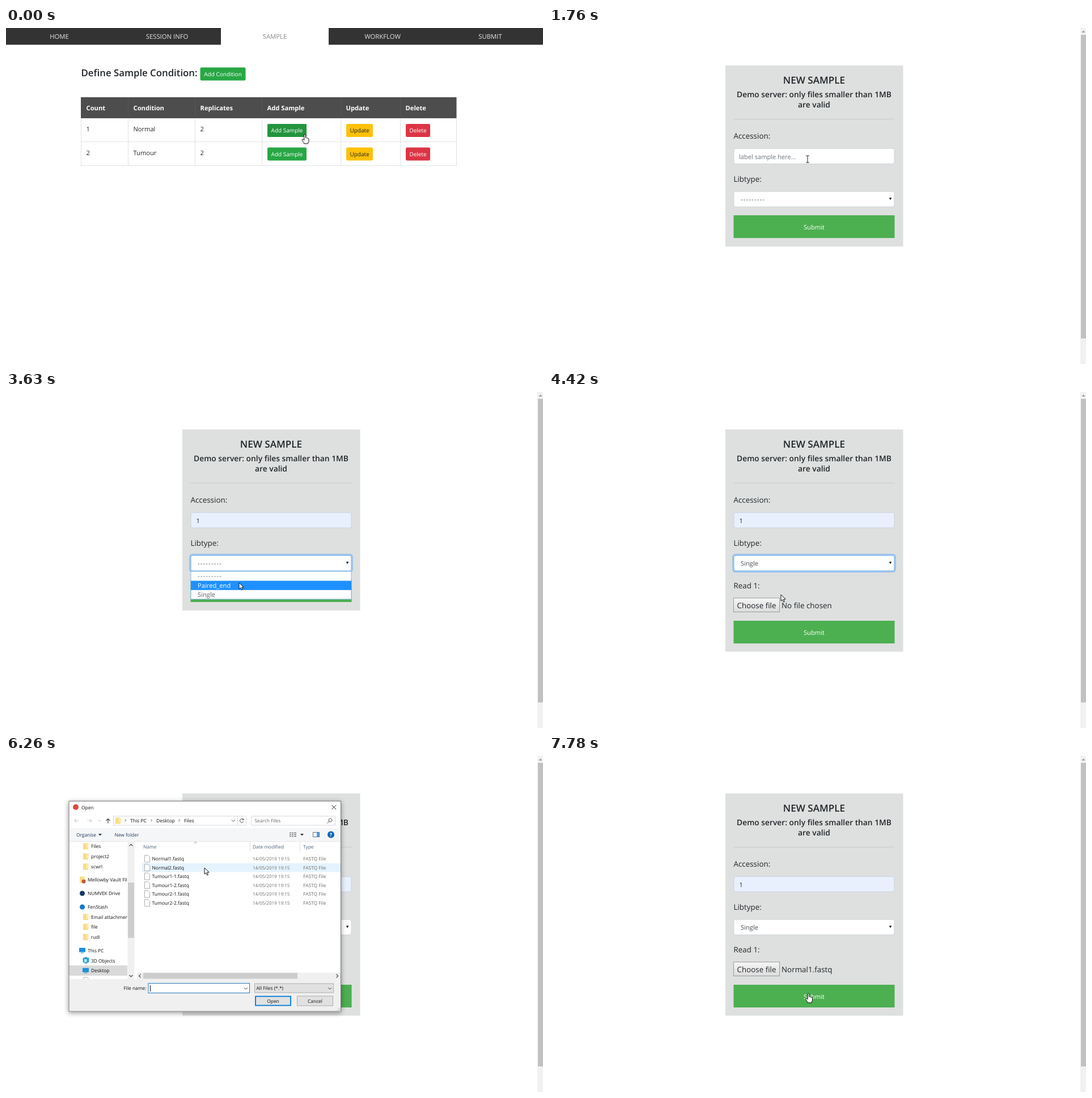
An HTML page for the animation above (7990 ms loop, 947 by 592 pixels).

```html
<!DOCTYPE html>
<html lang="en">
<head>
<meta charset="utf-8">
<title>Adding a sample</title>
<style>
  html, body { margin: 0; width: 100%; height: 100%; overflow: hidden; background: #fff; }
  svg { display: block; width: 947px; height: 592px; font-family: "Open Sans", "Noto Sans", sans-serif; }
  text { white-space: pre; text-rendering: geometricPrecision; }
  .mid { text-anchor: middle; }
  .end { text-anchor: end; }
  .semi { font-weight: 600; }
  .bold { font-weight: 700; }
  .dash { letter-spacing: 1.18px; }
  #dialog { transform-origin: 350px 265px; filter: drop-shadow(0 2px 4px #0006); }
</style>
</head>
<body>
<svg id="stage" viewBox="0 0 947 592"></svg>
<script>
const LOOP = 7990;

const box = (x, y, w, h, fill, more = '') =>
  `<rect x="${x}" y="${y}" width="${w}" height="${h}" fill="${fill}" ${more}/>`;
const text = (x, y, str, size, fill, cls = '') =>
  `<text x="${x}" y="${y}" font-size="${size}" fill="${fill}" class="${cls}">${str}</text>`;
const line = (d, stroke, width = 1) =>
  `<path d="${d}" fill="none" stroke="${stroke}" stroke-width="${width}"/>`;
const shape = (d, fill) => `<path d="${d}" fill="${fill}"/>`;
const dot = (x, y, r, fill) => `<circle cx="${x}" cy="${y}" r="${r}" fill="${fill}"/>`;
const layer = (id, ...parts) => `<g id="${id}">${parts.join('')}</g>`;
const framed = (x, y, w, h, fill, stroke, more = '') =>
  box(x + .5, y + .5, w - 1, h - 1, fill, `stroke="${stroke}" ${more}`);
const chevron = (x, y, stroke = '#444') => line(`M${x - 3} ${y - 1.5}l3 3 3-3`, stroke);

// Table page
function tablePage() {
  const edges = [132, 215, 333, 451, 590, 695, 794];
  const heads = ['Count', 'Condition', 'Replicates', 'Add Sample', 'Update', 'Delete'];
  const tabs = ['HOME', 'SESSION INFO', 'SAMPLE', 'WORKFLOW', 'SUBMIT'];
  const button = (x, y, w, label, fill, ink = '#fff') =>
    box(x, y, w, 23, fill, 'rx="2.5"') + text(x + w / 2, y + 15.2, label, 10, ink, 'mid');

  let out = box(0, 0, 947, 29.5, '#333') + box(379, 0, 190, 30, '#fff');
  tabs.forEach((tab, i) => {
    out += text(94 + i * 190, 19, tab, 11.3, i === 2 ? '#888' : '#e6e6e6', 'mid');
  });
  out += text(132.5, 85, 'Define Sample Condition:', 16.8, '#212529', 'semi');
  out += button(342.5, 69.5, 80, 'Add Condition', '#28a745');
  out += box(132, 122, 662.5, 37, '#4d4d4d');
  out += edges.slice(1, 6).map(x => line(`M${x + .5} 122v37`, '#565656')).join('');
  out += heads.map((h, i) => text(edges[i] + 9.5, 145, h, 11.2, '#fff', 'bold')).join('');
  ['Normal', 'Tumour'].forEach((name, i) => {
    const y = 159 + i * 41.5;
    out += [i + 1, name, 2].map((v, c) => text(edges[c] + 9.5, y + 23, v, 11.1, '#212529')).join('');
    out += button(461, y + 10, 69, 'Add Sample', '#28a745');
    out += button(600, y + 10, 47, 'Update', '#ffc107', '#212529');
    out += button(705, y + 10, 43, 'Delete', '#dc3545');
  });
  out += line(edges.map(x => `M${x + .5} 159V242.5`).join('') + 'M132 200.5H795M132 242.5H795', '#dee2e6');
  return layer('table', out,
    layer('warm', button(461, 169, 69, 'Add Sample', '#24943f')),
    layer('hover', button(461, 169, 69, 'Add Sample', '#218838')),
    layer('pressed', box(459.5, 167.5, 72, 26, 'none', 'rx="4" stroke="#28a745" stroke-opacity=".5" stroke-width="3"')));
}

// Form page
const field = (y, fill) => framed(325.5, y, 284, 28, fill, '#ced4da', 'rx="3"');
const ring = (id, y) => layer(id,
  box(324.5, y - 1, 286, 30, 'none', 'rx="4" stroke="#007bff" stroke-opacity=".28" stroke-width="3"'),
  framed(325.5, y, 284, 28, 'none', '#80bdff', 'rx="3"'));
const dashes = (y, fill = '#495057') => text(338, y, '-'.repeat(9), 11.2, fill, 'dash');

function submit(y) {
  return box(325.5, y, 284, 40, '#4caf50') + text(467.5, y + 24.5, 'Submit', 11.2, '#fff', 'mid');
}

function options(id, picked) {
  const rows = ['', 'Paired_end', 'Single'].map((label, i) => {
    const y = 316.3 + i * 16.3;
    const ink = i === picked ? '#fff' : '#5c6369';
    return (i === picked ? box(326, y, 283, 16.3, '#1e90ff') : '') +
      (i ? text(338, y + 12.3, label, 11.2, ink) : dashes(y + 12, ink));
  });
  return layer(id, framed(325.5, 315.5, 284, 50, '#fff', '#8fb4dc'), ...rows);
}

function suggestions() {
  const rows = Array.from({ length: 7 }, (_, i) => text(335.5, 258 + i * 24.3, i + 1, 11.1, '#333'));
  return layer('suggest', framed(325, 240, 286, 175, '#fff', '#c4c4c4'),
    layer('suggestHover', box(326, 242, 284, 24.3, '#e3e3e3')), ...rows);
}

function formPage() {
  const ink = '#212529';
  return layer('form',
    box(937, 0, 10, 592, '#f1f1f1'), box(938, 12, 9, 535, '#c1c1c1'), shape('M939.5 8l3-3.5 3 3.5z', '#9a9a9a'),
    layer('short', box(311, 66, 313.5, 319, '#dee0df'), submit(330)),
    layer('tall', box(311, 66, 313.5, 391.5, '#dee0df'), submit(403),
      text(325.5, 346, 'Read 1:', 13.4, ink),
      framed(325, 362.5, 82, 25.5, 'url(#face)', '#9a9a9a'),
      layer('chooseHover', box(326, 363.5, 80, 23.5, '#fff', 'opacity=".35"')),
      text(366, 381, 'Choose file', 13.4, ink, 'mid'),
      layer('noFile', text(410, 381, 'No file chosen', 13.4, ink)),
      layer('hasFile', text(410, 381, 'Normal1.fastq', 13.4, ink))),
    text(467.5, 98, 'NEW SAMPLE', 17.1, ink, 'semi mid'),
    text(467.5, 122, 'Demo server: only files smaller than 1MB', 13.8, ink, 'semi mid'),
    text(467.5, 139.5, 'are valid', 13.8, ink, 'semi mid'),
    line('M325.5 160.5H609.5', '#c8cac9'),
    text(325.5, 195, 'Accession:', 13.4, ink), text(325.5, 271, 'Libtype:', 13.4, ink),
    field(211.8, '#fff'), field(287.6, '#fff'),
    layer('filled', field(211.8, '#e8f0fe')),
    layer('hint', text(335, 231, 'label sample here...', 11.1, '#6c757d')),
    layer('typed', text(335.5, 231, '1', 11.2, ink)),
    layer('caretA', box(335, 219, 1, 14, '#333')), layer('caretB', box(342, 219, 1, 14, '#333')),
    layer('none', dashes(306)), layer('single', text(338, 306, 'Single', 11.2, '#495057')),
    shape('M599.7 299h4.6l-2.3 4.2z', '#222'),
    ring('ringA', 211.8), ring('ringB', 287.6),
    suggestions(), options('pick0', 0), options('pick1', 1), options('pick2', 2));
}

// File dialog
const folder = (x, y) => box(x, y - 5.5, 9, 11, '#f9dc84') + box(x + 5.5, y - 5.5, 4, 9, '#ffe9a9');
const sheet = (x, y) => `<path d="M${x} ${y - 6}h6l3 3v9h-9z" fill="#fff" stroke="#999" stroke-width=".8"/>`;
const screen = (x, y) => box(x, y - 4.5, 11, 7.5, '#1d8fdc') + box(x + 3, y + 4, 5, 1, '#4b7fa8');

function sidebar() {
  const ink = '#111';
  const row = (x, y, label) => text(x, y + 3, label, 8.4, ink);
  const dirs = [['Files', 159], ['project2', 177], ['scwrl', 195],
    ['Email attachmen', 283.5], ['file', 301], ['rudi', 319]];
  return `<g clip-path="url(#side)">` +
    box(111, 369, 103, 18, '#d9d9d9') +
    dirs.map(([label, y]) => folder(136, y) + row(150, y, label)).join('') +
    folder(130, 218) + dot(137, 221, 3.4, '#c6552f') + row(144, 218, 'Mellowby Vault Fil') +
    dot(134.5, 242, 4.5, '#143a68') + row(144, 242, 'NUMVEK Drive') +
    dot(134.5, 266, 4.5, '#0f7bd0') + row(144, 266, 'FenStash') +
    screen(129, 342.5) + row(144, 342.5, 'This PC') +
    shape('M135.5 356l5.500-2 5.500 2v7l-5.500 3-5.500-3z', '#2aa3dd') + box(138, 358, 4.5, 5, '#bfe6f7') +
    row(150, 360.500, '3D Objects') + screen(135, 378) + row(150, 378, 'Desktop') +
    sheet(137, 396) + row(150, 396, 'Documents') + '</g>' +
    box(214.5, 150, 12, 243, '#f0f0f0') + box(215, 223, 11, 97.5, '#cdcdcd') +
    line('M217.500 158.500l3-3 3 3M217.500 386l3 3 3-3', '#444', 1.1);
}

function fileList() {
  const names = ['Normal1', 'Normal2', 'Tumour1-1', 'Tumour1-2', 'Tumour2-1', 'Tumour2-2'];
  const head = '#4c607a';
  return text(242, 163, 'Name', 8.4, head) + text(435, 163, 'Date modified', 8.3, head) +
    text(524, 163, 'Type', 8.4, head) +
    line('M430.5 151v17M518.500 151v17', '#e0e0e0') + line('M331.500 153.500l2.500-2 2.500 2', '#777', .8) +
    layer('rowHover2', box(240, 189, 350, 15.5, '#e5f3ff')),
    layer('rowHover1', box(240, 173, 350, 16, '#e5f3ff'));
}

function rows() {
  const names = ['Normal1', 'Normal2', 'Tumour1-1', 'Tumour1-2', 'Tumour2-1', 'Tumour2-2'];
  const head = '#4c607a';
  const heads = text(242, 163, 'Name', 8.4, head) + text(435, 163, 'Date modified', 8.3, head) +
    text(524, 163, 'Type', 8.4, head) + line('M430.5 151v17M518.5 151v17', '#e0e0e0') +
    line('M331.5 153.5l2.5-2 2.5 2', '#777', .8);
  const marks = layer('rowHover2', box(240, 189, 350, 15.5, '#e5f3ff')) +
    layer('rowHover1', box(240, 173, 350, 16, '#e5f3ff')) +
    layer('selected', framed(240, 173, 350, 16, '#cce8ff', '#99d1ff'));
  return heads + marks + names.map((name, i) => {
    const y = 181 + i * 15.55;
    return sheet(244.5, y) + text(257.5, y + 3, name + '.fastq', 8.45, '#111') +
      text(435, y + 3, '14/05/2019 19:15', 8.05, '#6d6d6d') + text(524, y + 3, 'FASTQ File', 8.4, '#6d6d6d');
  }).join('') +
    box(231, 381.5, 359, 11.5, '#f0f0f0') + box(242, 382, 272, 10.5, '#cdcdcd') +
    line('M237.5 384.5l-3 3 3 3M582.5 384.5l3 3-3 3', '#444', 1.1);
}

function dialog() {
  const ink = '#111';
  const crumbs = [['This PC', 219], ['Desktop', 265], ['Files', 314]];
  return layer('dialog',
    box(110.5, 79, 480.5, 371.5, '#fff'),
    layer('titleOn', dot(123, 90, 5, '#dc4a3d'), text(133, 93.5, 'Open', 8.4, ink),
      line('M574.5 86.5l7.500 7.500m0-7.500l-7.500 7.500', '#222')),
    layer('titleOff', text(117, 93.5, 'Open', 8.4, ink)),
    line('M129 114h-8m3-3l-3 3 3 3M143 114h8m-3-3l3 3-3 3', '#cfcfcf', 1.1),
    line('M163 113l2 2 2-2', '#bbb'),
    line('M180 118.500v-8m-3.500 3.500l3.500-3.500 3.500 3.500', '#444', 1.2),
    framed(189, 105.500, 235, 17, '#fff', '#d9d9d9'), folder(193, 114),
    crumbs.map(([label, x]) => line(`M${x - 9.5} 111.500l2 2-2 2`, '#555') + text(x, 116.5, label, 8.5, ink)).join(''),
    chevron(401, 114), line('M408.500 106v16', '#d9d9d9'),
    line('M418.500 112a3.300 3.300 0 1 0 .5 3M419 110v2.500h-2.500', '#444'),
    framed(432, 105.500, 149, 17, '#fff', '#d9d9d9'), text(438.5, 116.5, 'Search Files', 8.4, '#666'),
    line('M570 115l-3.500 3.500M570 115a2.700 2.700 0 1 1 3.800-3.800 2.700 2.700 0 1 1-3.800 3.800', '#555'),
    box(111, 127, 479.5, 23, '#f5f6f7'), line('M111 150.500H590', '#e3e5e8'),
    text(124, 141.5, 'Organise', 8.4, '#1e395b'), shape('M163 137h6l-3 3.500z', '#1e395b'),
    text(191.5, 141.5, 'New folder', 8.4, '#1e395b'),
    line('M500 135.500h3m1 0h3m1 0h4M500 138.500h3m1 0h3m1 0h4M500 141.500h3m1 0h3m1 0h4', '#777', 1.4),
    shape('M519 137h6l-3 3.500z', '#333'),
    framed(541, 134, 12, 9, '#fff', '#5b7898'), box(548, 135, 4, 7, '#4b9ce0'),
    dot(573, 138.5, 6, '#0f66b5'), text(573, 141.8, '?', 9, '#fff', 'bold mid'),
    sidebar(), rows(),
    box(111, 393, 479.5, 57, '#f0f0f0'),
    text(247.5, 412, 'File name:', 8.4, ink, 'end'),
    framed(250.5, 400, 179.5, 18, '#fff', '#2478bd'), chevron(423, 409.5),
    layer('caretC', box(254, 404, 1, 11, '#111')),
    layer('fileName', text(253.5, 412.5, 'Normal1.fastq', 8.45, ink)),
    framed(438, 400.5, 140, 17, '#e1e1e1', '#adadad'), text(441.5, 412, 'All Files (*.*)', 8.4, ink), chevron(571, 409.5),
    box(440, 423.5, 62, 16, '#e1e1e1', 'stroke="#0078d7" stroke-width="1.8"'),
    layer('openHover', framed(439, 422.5, 64, 18, '#e5f1fb', '#0078d7')),
    text(471, 434.5, 'Open', 8.4, ink, 'mid'),
    framed(513, 422.5, 64, 18, '#e1e1e1', '#adadad'), text(545, 434.5, 'Cancel', 8.4, ink, 'mid'),
    line('M584 448.500l5-5M587 448.500l2-2', '#aaa', 1),
    framed(110.5, 79, 480.5, 371.5, 'none', '#777'));
}

function pointer() {
  const solid = d => `<path d="${d}" fill="#fff" stroke="#111" stroke-linejoin="round"/>`;
  return layer('pointer',
    layer('click', dot(0, 0, 9.5, '#ffee2c" fill-opacity=".75')),
    layer('arrow', solid('M0 0V11.200L2.700 8.800 4.500 13 6.400 12.200 4.600 8H8.200Z')),
    layer('hand', solid('M-1.300 1Q0-.6 1.300 1V6.200Q2.600 5.200 3.400 6.800Q5 6 5.400 7.600Q7 7 7 8.800V12Q7 14 5.600 15V16.800H-1.600V15.400Q-2.600 14-4.800 10.600Q-5.200 8.600-3.200 9L-1.300 10.600Z')),
    layer('beam', line('M-3-6H-.8L0-5.300 .8-6H3M0-5.300V5.300M-3 6H-.8L0 5.300 .8 6H3', '#333', 1.1)));
}

const stage = document.getElementById('stage');
stage.innerHTML = `<defs>
  <linearGradient id="face" x2="0" y2="1"><stop stop-color="#f6f6f6"/><stop offset="1" stop-color="#dcdcdc"/></linearGradient>
  <clipPath id="side"><rect x="111" y="150" width="103" height="243"/></clipPath>
</defs>` + tablePage() + formPage() + dialog() + pointer();

// When each layer is visible: [from, to] in ms
const spans = {
  table: [0, 990], warm: [0, 120], hover: [120, 990], pressed: [550, 990],
  form: [990, LOOP], short: [990, 4420], tall: [4420, LOOP],
  hint: [990, 2420], typed: [2420, LOOP], filled: [2550, LOOP],
  ringA: [1980, 3310], ringB: [3310, 5300], caretA: [1980, 2420], caretB: [2550, 2980],
  suggest: [2100, 2550], suggestHover: [2420, 2550],
  none: [990, 4420], single: [4420, LOOP],
  pick0: [3310, 3630], pick1: [3630, 3870], pick2: [3870, 4420],
  chooseHover: [4620, 5390], noFile: [4420, 7230], hasFile: [7230, LOOP],
  dialog: [5610, 7540], titleOn: [5610, 7120], titleOff: [7120, 7540],
  openHover: [5610, 5940], rowHover2: [6260, 6370], rowHover1: [6370, 6900],
  selected: [6900, 7540], caretC: [5610, 6690], fileName: [6900, 7540]
};

// Pointer stops: time, x, y, shape
const stops = [
  [0, 527, 187, 'hand'], [120, 527.5, 187.5, 'hand'], [550, 524, 187, 'hand'], [660, 522, 186, 'hand'],
  [990, 520, 184, 'arrow'], [1420, 461, 238, 'beam'], [1640, 458, 234, 'beam'], [1760, 456, 231, 'beam'],
  [2420, 438, 256, 'arrow'], [2550, 436, 261, 'arrow'], [2760, 429, 279, 'arrow'],
  [2980, 421, 300, 'arrow'], [3100, 418, 307, 'arrow'],
  [3630, 411, 336, 'arrow'], [3750, 410, 346, 'arrow'], [3870, 409, 352, 'arrow'], [3980, 409, 357, 'arrow'],
  [4620, 398, 361, 'arrow'], [4740, 391, 365, 'arrow'], [4960, 388, 369, 'arrow'],
  [5390, 472, 432, 'arrow'], [5940, 378, 267, 'arrow'],
  [6260, 350, 197, 'arrow'], [6370, 335, 182, 'arrow'], [6470, 330, 176.5, 'arrow'],
  [7540, 405, 330, 'arrow'], [7660, 446, 405, 'hand'], [7780, 457.5, 418, 'hand']
];
const clicks = [[660, 770], [1980, 2100], [2550, 2760], [3310, 3630], [5300, 5390], [6900, 7230]];

const el = id => document.getElementById(id);
const within = (t, [from, to]) => t >= from && t < to;
const show = (id, on) => el(id).setAttribute('visibility', on ? 'inherit' : 'hidden');

function render(t) {
  for (const id in spans) el(id).style.display = within(t, spans[id]) ? '' : 'none';

  const [, x, y, kind] = stops.findLast(s => s[0] <= t);
  el('pointer').setAttribute('transform', `translate(${x} ${y})`);
  for (const id of ['arrow', 'hand', 'beam']) show(id, id === kind);
  show('click', clicks.some(c => within(t, c)));

  const [alpha, scale] = t < 5740 ? [.9, .995] : t < 7230 ? [1, 1] : [.08, .96];
  Object.assign(el('dialog').style, { opacity: alpha, transform: `scale(${scale})` });
}

const start = performance.now();
function tick() {
  render((performance.now() - start) % LOOP);
  requestAnimationFrame(tick);
}
tick();
</script>
</body>
</html>
```
